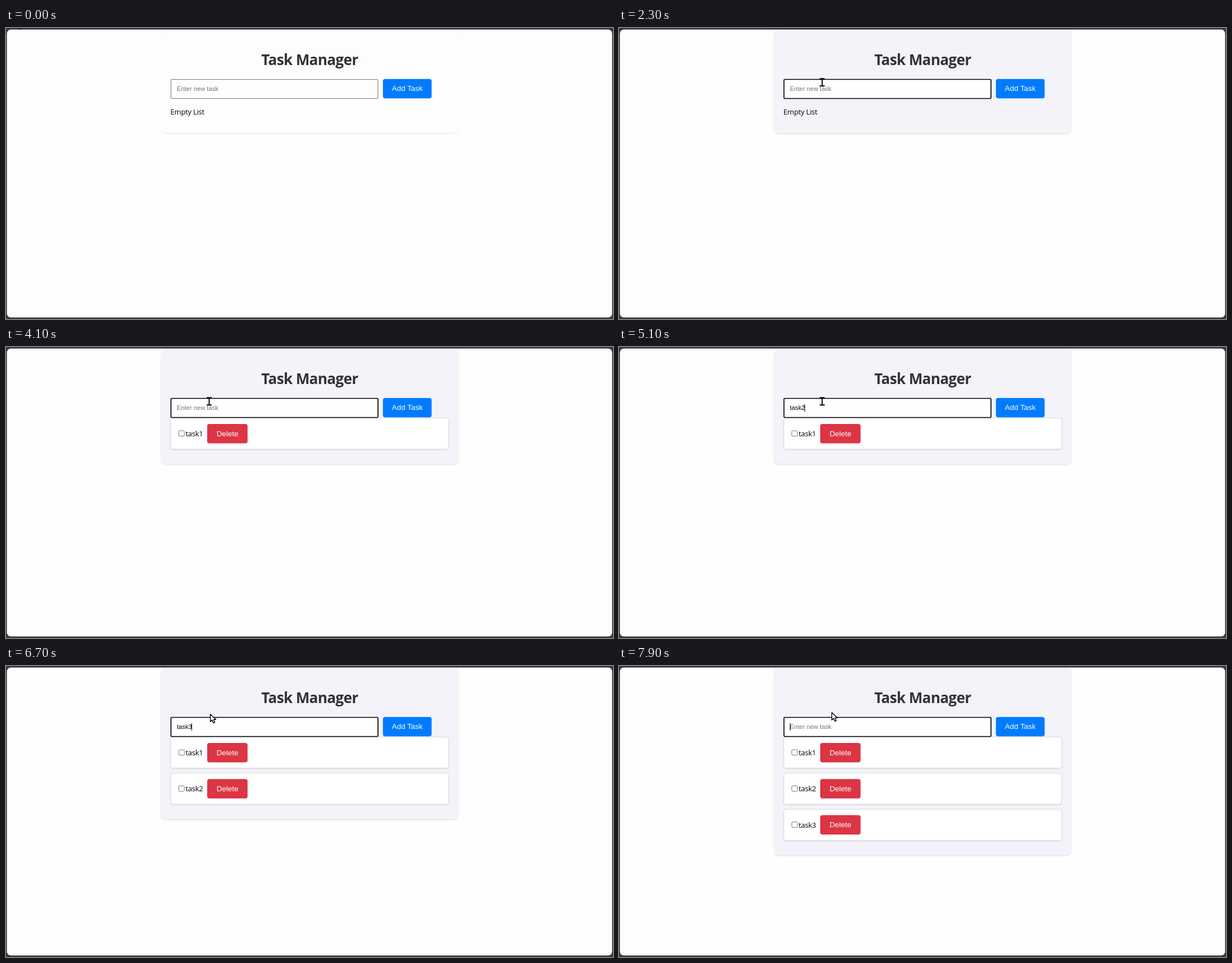
Write an HTML page that moves like this. It is 1080 px wide and 518 px high and loops after 8000 ms.

```html
<!DOCTYPE html>
<html lang="en">
<head>
<meta charset="utf-8">
<title>Task Manager</title>
<style>
  html, body { margin: 0; width: 100%; height: 100%; overflow: hidden; background: #3b393b; }
  svg { display: block; overflow: hidden; }
  #page { fill: #fefefe; }
  #panel { fill: #f4f3f9; filter: drop-shadow(0 2px 1.8px rgba(0, 0, 0, .1)); }
  #field { fill: #fff; stroke: #000; stroke-width: 1.7; }
  #add { fill: #007bff; }
  .card { fill: #fff; stroke: #ddd; filter: drop-shadow(0 1px 1.5px rgba(0, 0, 0, .1)); }
  .check { fill: #fff; stroke: #767676; }
  .delete { fill: #dc3545; }
  .idle :is(#page, #panel, #field) { fill: #fdfdfd; }
  .idle #panel { filter: drop-shadow(0 1.5px .5px rgba(0, 0, 0, .1)); }
  .blurred #field { stroke: #767676; stroke-width: 1; }
  text { font: 13px "Open Sans", "Noto Sans", sans-serif; letter-spacing: -.25px; fill: #000; }
  .title { font-size: 26px; font-weight: 700; letter-spacing: -.6px; fill: #333; text-anchor: middle; }
  .label { font: 13.4px "Liberation Sans", Arial, sans-serif; letter-spacing: 0; fill: #fff; text-anchor: middle; }
  .entry { font: 11.17px "Liberation Sans", Arial, sans-serif; letter-spacing: 0; }
  #hint { fill: #757575; }
  #arrow { fill: #fff; stroke: #000; stroke-width: 1.4; stroke-linejoin: round; }
  #beam { fill: none; stroke: #000; stroke-width: 2; }
</style>
</head>
<body>
<svg id="stage" width="1080" height="518">
  <rect id="page" x="1.6" y="2.8" width="1076.8" height="512.4" rx="7"/>
  <rect id="panel" x="276" y="3" width="529" rx="8.5"/>
  <g id="rows"></g>
  <rect id="field" x="293.5" y="91.5" width="368.3" height="34" rx="1.5"/>
  <rect id="add" x="670.6" y="90.8" width="86.7" height="34.5" rx="4"/>
  <text class="title" x="540.3" y="66">Task Manager</text>
  <text class="label" x="714" y="112">Add Task</text>
  <text id="empty" x="292.6" y="153.7">Empty List</text>
  <text id="hint" class="entry" x="304" y="112">Enter new task</text>
  <text id="typed" class="entry" x="304" y="112"></text>
  <rect id="caret" y="102" width="1" height="13"/>
  <path id="arrow" d="M.6.8V14.2L3.7 11.3 6 16.4 8.5 15.3 6.3 10.3H10.4Z"/>
  <path id="beam" d="M-4.5-6.5H4.5M0-6.5V6.5M-4.5 6.5H4.5"/>
</svg>
<script>
  const LOOP = 8000, ROW_STEP = 64.3;
  const $ = id => document.getElementById(id);
  const show = (el, on) => { el.style.display = on ? "" : "none"; };

  // Each entry: time in ms, value held from then on.
  const typing = [
    [0, ""], [3000, "t"], [3200, "ta"], [3400, "tas"], [3500, "task"], [3600, "task1"],
    [3800, ""], [4500, "t"], [4700, "ta"], [4900, "task"], [5100, "task2"],
    [5500, ""], [6100, "t"], [6300, "ta"], [6400, "tas"], [6500, "task"], [6700, "task3"], [7100, ""]
  ];
  const caretStates = [
    [0, false], [1800, true], [2300, false], [2800, true], [4100, false],
    [4500, true], [5700, false], [6100, true], [7200, false], [7700, true]
  ];
  const pointer = [
    [0, ["arrow", 18.5, -14.6]], [100, ["arrow", 18, -15.5]], [200, null],
    [1400, ["arrow", 228, 25]], [1500, ["arrow", 290, 58]], [1600, ["arrow", 341, 84]],
    [1700, ["beam", 361.5, 96.8]], [6100, ["arrow", 363, 85]],
    [7700, ["arrow", 364, 85]], [7900, ["arrow", 378, 82]]
  ];
  const added = [3800, 5500, 7100];

  const at = (track, t) => {
    let value;
    for (const [start, v] of track) if (start <= t) value = v;
    return value;
  };

  $("rows").innerHTML = added.map((_, i) => `
    <g transform="translate(0 ${i * ROW_STEP})">
      <rect class="card" x="293.3" y="126.5" width="494.3" height="55.2" rx="4"/>
      <rect class="check" x="307.5" y="149" width="9.8" height="9.8" rx="1.8"/>
      <text x="319.5" y="159">task${i + 1}</text>
      <rect class="delete" x="358" y="137" width="71.8" height="34.4" rx="4"/>
      <text class="label" x="394" y="158.5">Delete</text>
    </g>`).join("");

  function render(t) {
    $("stage").setAttribute("class", (t < 1500 ? "idle " : "") + (t < 1800 ? "blurred" : ""));

    const count = added.filter(time => time <= t).length;
    [...$("rows").children].forEach((row, i) => show(row, i < count));
    show($("empty"), count === 0);
    const bottom = count ? 207.7 + (count - 1) * ROW_STEP : 187;
    $("panel").setAttribute("height", bottom - 3);

    const text = at(typing, t);
    $("typed").textContent = text;
    show($("hint"), !text);
    show($("caret"), at(caretStates, t));
    const end = text ? $("typed").getComputedTextLength() : 0;
    $("caret").setAttribute("x", Math.round(304 + end - .4));

    const [kind, x, y] = at(pointer, t) || [];
    for (const id of ["arrow", "beam"]) show($(id), id === kind);
    if (kind) $(kind).setAttribute("transform", `translate(${x} ${y})`);
  }

  function tick() {
    render(performance.now() % LOOP);
    requestAnimationFrame(tick);
  }
  tick();
</script>
</body>
</html>
```
